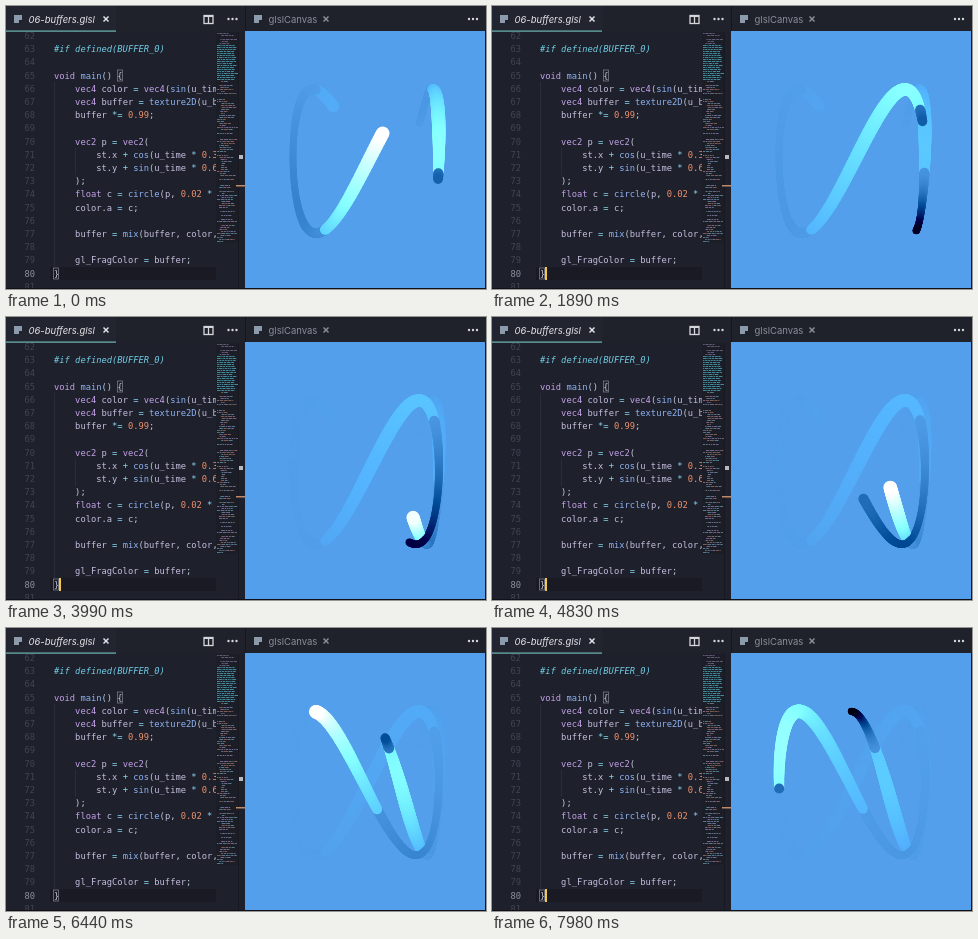
Write an HTML page with a canvas that moves like this. It is 480x283 px and loops after 8 s.

```html
<!DOCTYPE html>
<html lang="en">
<head>
<meta charset="utf-8">
<title>Shader buffers</title>
<style>
  html, body { margin: 0; width: 100%; height: 100%; overflow: hidden; background: #1e202b; }
  canvas { display: block; }
</style>
</head>
<body>
<canvas id="stage" width="480" height="283"></canvas>
<script>
const ctx = document.getElementById('stage').getContext('2d');
const LOOP = 8000, STEP = 70;
const BG = '#1e202b', ROW = '#191a23';
const SKY = [0.325, 0.625, 0.92];

function rect(x, y, w, h, color) {
  ctx.fillStyle = color;
  ctx.fillRect(x, y, w, h);
}

function line(color, width, ...points) {
  ctx.strokeStyle = color;
  ctx.lineWidth = width;
  ctx.beginPath();
  for (const [x, y] of points) ctx.lineTo(x, y);
  ctx.stroke();
}

function dot(x, y, r, color) {
  ctx.fillStyle = color;
  ctx.beginPath();
  ctx.arc(x, y, r, 0, 7);
  ctx.fill();
}

// ---- Editor ----
const FIRST_LINE = 62, CHAR = 5.28;
const code = `
#if defined(BUFFER_0)

void main() {
    vec4 color = vec4(sin(u_time * 0.5
    vec4 buffer = texture2D(u_buffer0
    buffer *= 0.99;

    vec2 p = vec2(
        st.x + cos(u_time * 0.3
        st.y + sin(u_time * 0.6
    );
    float c = circle(p, 0.02 *
    color.a = c;

    buffer = mix(buffer, color,

    gl_FragColor = buffer;
}
`.split('\n');

const lineY = n => 43 + 13.2 * (n - 63);

function tokenColor(token, next) {
  if (token[0] === '#') return '#72cfe8';
  if (/^(void|vec\d|float)$/.test(token)) return '#c5a3ea';
  if (/^\d/.test(token)) return '#f0946e';
  if (/^\w/.test(token)) return next === '(' ? '#8fb4f5' : '#c6bfe0';
  return /[=*+]/.test(token) ? '#89d5ee' : '#c3cbdc';
}

function drawCode() {
  rect(44, 261, 166, 13, ROW);
  line('#2a2c38', 1, [48.5, 76], [48.5, 261]);
  line('#2a2c38', 1, [69.5, 142], [69.5, 169]);
  const font = '8.77px "DejaVu Sans Mono", monospace';
  code.forEach((text, i) => {
    const n = FIRST_LINE + i, y = lineY(n) + 3.1;
    ctx.font = font;
    ctx.fillStyle = n === 80 ? '#8d92a1' : '#414554';
    ctx.fillText(n, 18.5, y);
    ctx.save();
    ctx.beginPath();
    ctx.rect(40, 26, 170, 257);
    ctx.clip();
    for (const m of text.matchAll(/#.*|\d+\.\d*|\w+|\S/g)) {
      ctx.font = (m[0][0] === '#' ? 'italic ' : '') + font;
      ctx.fillStyle = tokenColor(m[0], text[m.index + m[0].length]);
      ctx.fillText(m[0], 48 + m.index * CHAR, y);
    }
    ctx.restore();
  });
  ctx.strokeStyle = '#777b88';
  ctx.lineWidth = 0.8;
  ctx.strokeRect(111.4, 64, 5, 11);
  ctx.strokeRect(47.4, 262, 5, 11);
}

function drawMinimap() {
  let seed = 7;
  const random = () => (seed = seed * 16807 % 2147483647) / 2147483647;
  const palette = ['#a58bc9', '#87909f', '#6fa9c0', '#b57b69'];
  rect(210, 26, 22, 211, '#1b1d27');
  for (let y = 27; y < 236; y += 2) {
    const teal = y > 38 && y < 74, indent = teal || random() < 0.3 ? 0 : 2 + random() * 3;
    if (!teal && random() < 0.2) continue;
    const end = teal ? 15 + random() * 4 : 6 + random() * 14;
    for (let x = indent; x < end;) {
      const w = 1 + random() * 3;
      const color = teal ? '#4b9cad' : y < 38 ? '#8a7aa0' : palette[random() * 4 | 0];
      ctx.globalAlpha = teal ? 0.85 : 0.65;
      rect(211 + x, y, w, 1, color);
      x += w + 0.7;
    }
  }
  ctx.globalAlpha = 1;
  rect(232, 26, 1, 257, '#171821');
  rect(233, 149, 4, 4, '#b9bac0');
  rect(230, 179, 9, 1.5, '#c08a68');
}

function drawTab(x, name, style, color, closeX) {
  rect(x + 8, 9, 8, 8, '#8b9bab');
  rect(x + 13, 14, 3, 3, BG);
  ctx.font = `${style} 9.5px Inter, sans-serif`;
  ctx.fillStyle = color;
  ctx.fillText(name, x + 22.5, 16.7);
  line(color, 1.4, [closeX - 2.5, 10.5], [closeX + 2.5, 15.5]);
  line(color, 1.4, [closeX + 2.5, 10.5], [closeX - 2.5, 15.5]);
}

function drawMenuDots(x) {
  for (let i = 0; i < 3; i++) dot(x + i * 4, 13, 1.2, '#d5d6da');
}

function drawWindow() {
  rect(0, 0, 480, 283, BG);
  rect(0, 0, 480, 25, '#1f212b');
  rect(0, 0, 110, 25, '#22242f');
  rect(0, 24.5, 110, 1.2, '#6fb7b5');
  drawTab(0, '06-buffers.glsl', 'italic', '#e4e5e9', 100);
  drawTab(240, 'glslCanvas', 'normal', '#8b8f9c', 320);
  ctx.strokeStyle = '#d5d6da';
  ctx.lineWidth = 1.3;
  ctx.strokeRect(198, 9.5, 9, 8);
  line('#d5d6da', 1.3, [202.5, 9], [202.5, 17]);
  rect(198, 9, 9, 2, '#d5d6da');
  drawMenuDots(222.5);
  drawMenuDots(463);
  drawCode();
  drawMinimap();
  rect(239, 0, 1, 25, '#15161d');
  rect(479, 25, 1, 258, '#15161d');
  rect(0, 282, 480, 1, '#101118');
}

// ---- Shader preview ----
// Each brush follows a Lissajous path; its tone drives both colour and radius.
const brushes = [
  { x: t => 0.57 * t - 1.34, y: t => 1.14 * t + 0.4, tone: t => Math.cos(t - 0.12) },
  { x: t => 0.178 * t + 0.16, y: t => 0.555 * t + 0.25 + Math.PI, tone: t => Math.cos(t - 4.55) }
];
const FIRST_STROKE = -5.1, DT = 1 / 60;
const DARK_DECAY = 1.3;
const LIGHT = [
  { base: 0.2, gain: 0.5, decay: 1 },
  { base: 0.4, gain: 0.3, decay: 2.1 },
  { base: 0.4, gain: 0.3, decay: 2.1 }
];

// Positive tones add light, negative ones take it away; both fade into the sky.
function paintColor(tone, age) {
  const dark = (0.2 + 0.7 * Math.abs(tone) ** 1.5) * Math.exp(-age / DARK_DECAY);
  const rgb = LIGHT.map(({ base, gain, decay }, i) => {
    const shift = tone > 0 ? (base + gain * tone) * Math.exp(-age / decay) : -dark;
    return Math.round(255 * Math.min(1, Math.max(0, SKY[i] + shift)));
  });
  return `rgb(${rgb})`;
}

function drawPreview(now) {
  rect(239, 25, 240, 257, `rgb(${SKY.map(v => Math.round(v * 255))})`);
  const count = Math.floor((now - FIRST_STROKE) / DT);
  for (let i = count; i >= 0; i--) {
    const age = i * DT, t = now - age;
    for (const brush of brushes) {
      const tone = brush.tone(t);
      dot(360 + 73 * Math.cos(brush.x(t)), 155.3 - 72 * Math.sin(brush.y(t)),
        5.1 + 1.7 * tone, paintColor(tone, age));
    }
  }
}

function drawCursor(ms) {
  rect(53, 261, 2, 13, ms % 1000 >= 500 ? '#f2c84b' : ROW);
}

let shown = -1;
const start = performance.now();

function frame() {
  const ms = Math.floor((performance.now() - start) % LOOP / STEP) * STEP;
  if (ms !== shown) {
    shown = ms;
    drawPreview(ms / 1000);
    drawCursor(ms);
  }
  requestAnimationFrame(frame);
}

drawWindow();
frame();
</script>
</body>
</html>
```
